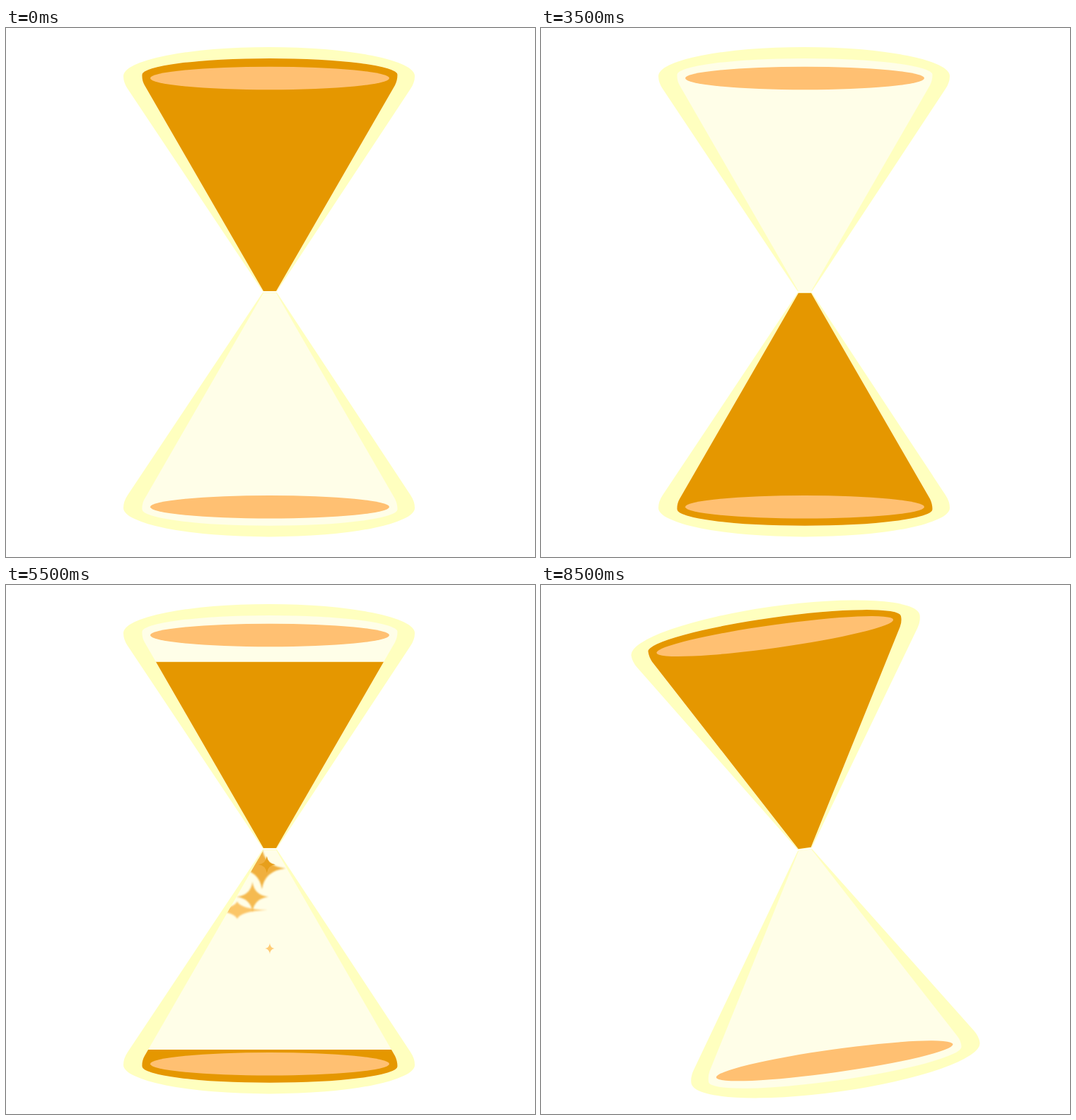
Recreate the animation shown at these times as an HTML page. Size 748 px wide and 748 px high, loop 8610 ms.

```html
<!DOCTYPE html>
<html>
<head>
<meta charset="utf-8">
<title>Hourglass</title>
<style>
html, body { margin: 0; width: 100%; height: 100%; overflow: hidden; background: #fff; }
svg { display: block; width: 100vw; height: 100vh; }
</style>
</head>
<body>
<svg viewBox="0 0 748 748">
  <defs>
    <path id="outer" d="M363 372.5 L172 86 Q166 77 166 68 A206 41 0 0 1 578 68 Q578 77 572 86 L383 372.5Z"/>
    <path id="inner" d="M364 372 L196 81 Q192 74 192.5 66 A180.5 23 0 0 1 553.5 66 Q553.5 74 550 81 L382 372Z"/>
    <clipPath id="topClip"><rect id="topRect" x="150" width="450"/></clipPath>
    <clipPath id="lowClip"><rect id="lowRect" x="150" width="450"/></clipPath>
    <clipPath id="cone"><use href="#inner" transform="matrix(1 0 0 -1 0 746.8)"/></clipPath>
    <filter id="soft" x="-20%" y="-20%" width="140%" height="140%"><feGaussianBlur stdDeviation="1"/></filter>
  </defs>
  <g id="glass">
    <use href="#outer" fill="#ffffbf"/>
    <use href="#outer" fill="#ffffbf" transform="matrix(1 0 0 -1 0 746.4)"/>
    <use href="#inner" fill="#fffee8"/>
    <use href="#inner" fill="#fffee8" transform="matrix(1 0 0 -1 0 746.8)"/>
    <g id="sparks" clip-path="url(#cone)"></g>
    <g clip-path="url(#topClip)"><use href="#inner" fill="#e59700"/></g>
    <g clip-path="url(#lowClip)"><use href="#inner" fill="#e59700" transform="matrix(1 0 0 -1 0 746.8)"/></g>
    <ellipse cx="373" cy="71" rx="169" ry="16.3" fill="#ffc072"/>
    <ellipse cx="373" cy="677.2" rx="169" ry="16.3" fill="#ffc072"/>
  </g>
</svg>
<script>
const $ = id => document.getElementById(id);
const LOOP = 8610, STEP = 100, CYCLE = 43, LIFE = 500;
const NECK = [373, 374];

const ease = (t, a, b) => {
  const u = Math.min(1, Math.max(0, (t - a) / (b - a)));
  return u * u * (3 - 2 * u);
};
const mix = (a, b, u) => a + (b - a) * u;

// One burst: birth, then place and reach at time 1900
const burst = [
  [1420, 452, 521, 56, 16],
  [1500, 422, 508, 32, 30],
  [1560, 400, 439, 52, 46],
  [1640, 391, 466, 25, 25],
  [1700, 320, 433, 26, 28],
  [1800, 373, 409, 5, 6],
  [1850, 370, 376, 5, 5]
];
const stars = [{ born: 300, age: 100, x: 377, y: 378, rx: 16, ry: 18 }];
for (let wave = -2; wave <= 2; wave++) {
  for (const [born, x, y, rx, ry] of burst) {
    stars.push({
      born: born + wave * 500, age: 1900 - born,
      x: wave % 2 ? 2 * NECK[0] - x : x, y, rx, ry
    });
  }
}
for (const s of stars) {
  s.el = document.createElementNS("http://www.w3.org/2000/svg", "path");
  $("sparks").appendChild(s.el);
}

function starPath(x, y, a, b) {
  const k = 0.11, p = (u, v) => `${x + u * a} ${y + v * b}`;
  return `M${p(1, 0)}Q${p(k, k)} ${p(0, 1)}Q${p(-k, k)} ${p(-1, 0)}Q${p(-k, -k)} ${p(0, -1)}Q${p(k, -k)} ${p(1, 0)}Z`;
}

function drawStar(s, t) {
  const age = t - s.born;
  const on = age > 0 && age < LIFE;
  s.el.style.display = on ? "" : "none";
  if (!on) return;
  const u = age / s.age, grow = Math.min(1.3, Math.sqrt(u));
  const x = mix(NECK[0], s.x, u), y = mix(NECK[1], s.y, u);
  const fade = Math.min(1, age / 320);
  s.el.setAttribute("d", starPath(x, y, s.rx * grow, s.ry * grow));
  s.el.setAttribute("fill", `rgb(${mix(226, 255, fade)},${mix(150, 196, fade)},${mix(10, 98, fade)})`);
  s.el.setAttribute("opacity", mix(1, 0.85, fade));
  if (s.rx > 25) s.el.setAttribute("filter", "url(#soft)");
}

function setBand(id, top, bottom) {
  $(id).setAttribute("y", top);
  $(id).setAttribute("height", Math.max(0, bottom - top));
}

function draw(ms) {
  const n = Math.min(Math.floor((ms % LOOP) / STEP), 2 * CYCLE - 1);
  const t = (n % CYCLE) * STEP;
  setBand("topRect", mix(42, 373, ease(t, 500, 2926)), 373);
  setBand("lowRect", mix(706, 374, ease(t, 600, 3080)), 720);
  stars.forEach(s => drawStar(s, t));
  $("glass").setAttribute("transform", `rotate(${180 * ease(t, 3500, 4302)} 373 373.4)`);
}

const start = performance.now();
function tick() {
  draw(performance.now() - start);
  requestAnimationFrame(tick);
}
tick();
</script>
</body>
</html>
```
